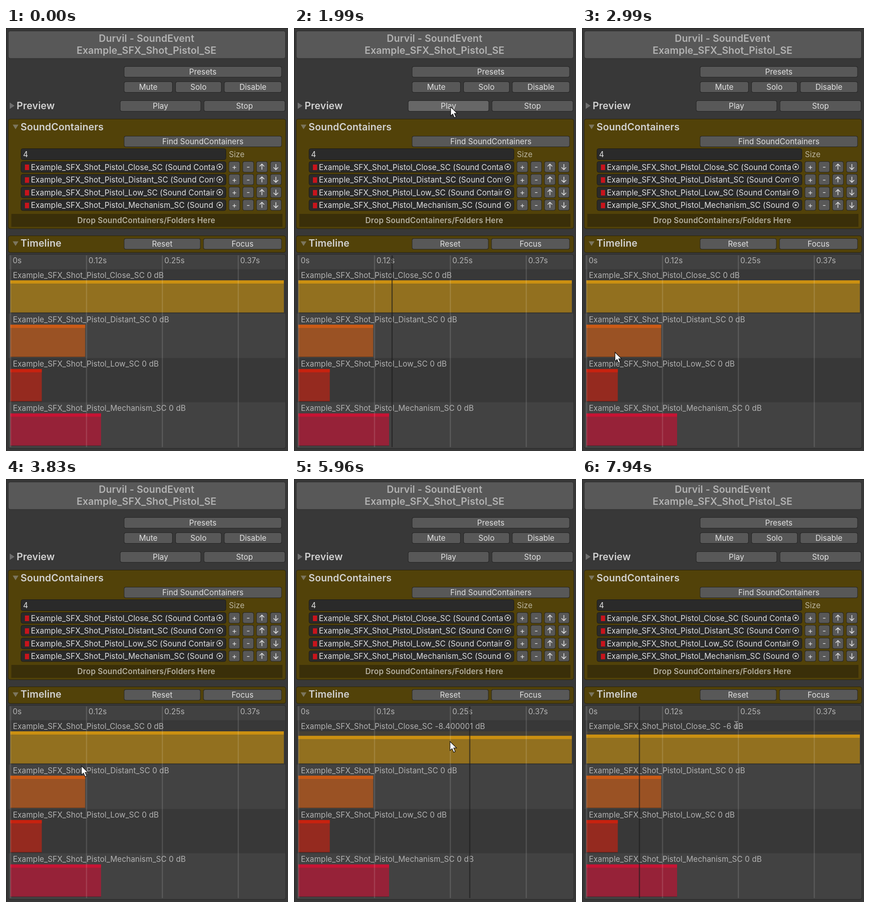
An HTML page that plays this animation: 611 px wide and 917 px high, repeating every 8 s.

```html
<!DOCTYPE html>
<html lang="en">
<head>
<meta charset="utf-8">
<title>Sound event inspector</title>
<style>
  html, body { margin: 0; width: 100%; height: 100%; overflow: hidden; background: #383838; }
  svg { display: block; width: 100%; height: 100%; }
  text { font: 16.7px Inter, sans-serif; font-optical-sizing: none; letter-spacing: .06px; fill: #e0e0e0; white-space: pre; }
  .bold { font-weight: 600; letter-spacing: .2px; }
  .head { font-weight: 600; font-size: 21.2px; letter-spacing: .12px; fill: #d2d2d2; }
  .dim { fill: #b2b2b2; }
  .mid { text-anchor: middle; }
</style>
</head>
<body>
<svg id="stage" viewBox="0 0 611 917" xmlns="http://www.w3.org/2000/svg"></svg>
<script>
const LOOP = 8000;
const ZERO_X = 10, SPEED = 1.315, END_X = 602;

const rect = (x, y, w, h, fill, more = '') =>
  `<rect x="${x}" y="${y}" width="${w}" height="${h}" fill="${fill}" ${more}/>`;
const text = (x, y, str, cls = '', more = '') =>
  `<text x="${x}" y="${y}" class="${cls}" ${more}>${str}</text>`;
const path = (d, fill, more = '') => `<path d="${d}" fill="${fill}" ${more}/>`;
const frame = (x, y, w, h, fill, edge, r = 4) =>
  rect(x + .5, y + .5, w - 1, h - 1, fill, `rx="${r}" stroke="${edge}"`);

function button(x, y, w, label, id = '') {
  return rect(x, y, w, 24, '#262626', 'rx="4"') +
    rect(x + 1, y + 1, w - 2, 22, '#585858', `rx="3.5" ${id && `id="${id}"`}`) +
    text(x + w / 2, y + 18, label, 'mid');
}

function arrowButton(x, y, dir) {
  const cx = x + 12.2, cy = y + 12;
  return button(x, y, 24.5, '') +
    path(`M${cx} ${cy - 6 * dir}V${cy + 6 * dir}M${cx - 5} ${cy + dir}L${cx} ${cy + 6 * dir}L${cx + 5} ${cy + dir}`,
      'none', 'stroke="#e0e0e0" stroke-width="1.6"');
}

const sounds = [
  { name: 'Close', end: 602, top: '#cb9011', body: '#92701f' },
  { name: 'Distant', end: 171.5, top: '#cb5a15', body: '#9a5224' },
  { name: 'Low', end: 77.5, top: '#c8220f', body: '#952a1f' },
  { name: 'Mechanism', end: 206, top: '#c81334', body: '#962238' }
];
const asset = s => `Example_SFX_Shot_Pistol_${s.name}_SC`;

function objectRow(s, i) {
  const y = 289 + i * 27.6;
  return frame(32, y, 445, 24.5, '#2a2a2a', '#1e1c14') +
    rect(41, y + 7, 9, 12, '#c8141c') +
    text(54, y + 18.5, asset(s) + ' (Sound Container)', '', 'clip-path="url(#field)"') +
    `<circle cx="463" cy="${y + 12}" r="6.3" fill="none" stroke="#c4c4c4" stroke-width="1.5"/>` +
    `<circle cx="463" cy="${y + 12}" r="2.4" fill="#c4c4c4"/>` +
    button(482.5, y, 24.5, '+') + button(512.5, y, 24.5, '-') +
    arrowButton(542.3, y, -1) + arrowButton(572.5, y, 1);
}

function track(s, i) {
  const y = 547 + i * 96.2, w = s.end - 9.5;
  const first = i === 0;
  return rect(9.5, y, w, 70, s.top, 'opacity=".09"') +
    rect(9.5, y, w, 70, s.body, first ? 'id="body"' : '') +
    rect(9.5, y, w, 7, s.top, first ? 'id="strip"' : '') +
    rect(9.5, y + 69, w, 1.5, '#000', 'opacity=".2"');
}

const trackLabel = (s, i) =>
  text(15, 541.7 + i * 96.2, asset(s) + ' 0 dB', 'dim', i ? '' : 'id="label"');

const gridLine = i => rect(8.8 + i * 164.4, 493, 2.5, 415.5, '#fff', 'opacity=".13"');

const tip = ['Previews the SoundEvent.', '', 'Does not work if Nolvy cannot build the project, or',
  'if the game is paused.', '', "Preview doesn't play more than one level of",
  'TriggerOnPlay/Stop/Tail at the moment (there is', 'full functionality ingame).', '',
  'The default shortcut is Ctrl+Q.'];

const olive = '#524209', oliveEdge = '#2c2408';
const stage = document.getElementById('stage');
stage.innerHTML = [
  '<clipPath id="field"><rect x="54" y="280" width="398" height="130"/></clipPath>',
  rect(0, 0, 611, 917, '#383838'),
  rect(0, 0, 1.5, 917, '#2a2a2a'), rect(0, 0, 611, 1.5, '#2a2a2a'),

  frame(4.5, 6, 601.5, 60.5, '#585858', '#2c2c2c'),
  text(304.5, 30.3, 'Durvil - SoundEvent', 'head mid', 'style="fill:#b2b2b2"'),
  text(304.5, 56.3, 'Example_SFX_Shot_Pistol_SE', 'head mid', 'style="fill:#b2b2b2"'),

  button(255.5, 83, 342, 'Presets'),
  button(255.5, 116, 105.5, 'Mute'), button(367, 116, 100, 'Solo'), button(472.5, 116, 125, 'Disable'),
  path('M8 161.5L18.5 168.5L8 175.5Z', '#6e6e6e'),
  text(23, 175.8, 'Preview', 'head'),
  button(247, 157, 175.5, 'Play', 'play'), button(428.5, 157, 176.5, 'Stop'),

  frame(4.5, 197, 602, 238.5, olive, oliveEdge),
  path('M14.5 209.5H27L20.7 219.5Z', '#7c765f'),
  text(31.5, 221.5, 'SoundContainers', 'head'),
  button(255.5, 234, 342, 'Find SoundContainers'),
  frame(32, 261, 445, 25, '#2a2a2a', '#1e1c14'),
  text(37, 279.5, '4'), text(483, 279.5, 'Size', '', 'style="fill:#bbb5a0"'),
  ...sounds.map(objectRow),
  rect(11.5, 403, 587.5, 28, '#3a2f09'),
  text(304, 422.5, 'Drop SoundContainers/Folders Here', 'bold mid', 'style="fill:#b3ae9e"'),

  frame(4.5, 450, 602, 37, olive, oliveEdge),
  path('M14.5 462.5H27L20.7 472.5Z', '#7c765f'),
  text(31.5, 474.3, 'Timeline', 'head'),
  button(255.5, 456, 166, 'Reset'), button(427.5, 456, 170, 'Focus'),

  frame(4.5, 490, 602, 422, '#414141', '#262626'),
  ...sounds.map((s, i) => rect(5.5, 523 + i * 96.2, 600, 96.2, i % 2 ? '#424242' : '#383838')),
  ...sounds.map(track),
  ...[0, 1, 2, 3].map(gridLine),
  ...['0s', '0.12s', '0.25s', '0.37s'].map((s, i) => text(14.5 + i * 164.3, 509.5, s, 'dim')),
  rect(304, 527, 87, 22, '#3a72b0', 'id="selection"'),
  ...sounds.map(trackLabel),
  rect(322, 527, 1.3, 20, '#d0d0d0', 'id="caret"'),
  rect(-1.3, 493, 2.6, 415.5, '#1c1c1c', 'id="playhead" opacity=".62"'),

  '<g id="tooltip">' + rect(134, 185, 410.5, 212.5, '#393939', 'stroke="#1b1b1b" stroke-width="1.6"') +
    tip.map((s, i) => text(139, 207 + i * 20.2, s, '', 'style="fill:#cfcfcf"')).join('') + '</g>',

  '<g id="pointer">',
  path('M0 0V19.5L4.5 15.4L8 23.4L11.4 22L8 14.2H14.2Z', '#fff',
    'class="arrow" stroke="#111" stroke-width="1.2"'),
  path('M0 -10L4.2 -5H1.3V5H4.2L0 10L-4.2 5H-1.3V-5H-4.2Z', '#000',
    'class="resize" stroke="#ddd" stroke-width=".8"'),
  path('M-4 -7.5Q0 -7.5 0 -5.5Q0 -7.5 4 -7.5M0 -5.5V6M-3 7.5Q0 7.5 0 6Q0 7.5 3 7.5', 'none',
    'class="beam" stroke="#a8a8a8" stroke-width="1.3"'),
  '</g>'
].join('');

const $ = id => document.getElementById(id);
const show = (el, on) => { el.style.display = on ? '' : 'none'; };

// Pointer stops: time, x, y
const route = [
  [720, 1, 590], [900, 130, 470], [1080, 400, 300], [1200, 516, 200], [1320, 410, 145], [1440, 339.5, 171],
  [2450, 339.5, 171], [2510, 329, 258], [2570, 305, 350], [2690, 190, 520], [2810, 60, 640],
  [2930, 33, 690], [3050, 110, 716], [3260, 200, 715], [3410, 270, 735], [3530, 288, 710],
  [3650, 240, 668], [3830, 163.5, 622], [3950, 146, 575], [4100, 138, 540], [4369, 138, 540],
  [4430, 145, 555], [4650, 145, 540], [4770, 145, 523], [4830, 145, 548], [4890, 145, 578],
  [4950, 145, 597], [5070, 145, 601], [5310, 145, 603], [5480, 145, 603], [5600, 175, 604],
  [5720, 250, 598], [5840, 315, 585], [5960, 338, 569], [6080, 337, 545], [6260, 334, 533]
];
const holds = [[1440, 2510], [4430, 4650]];
const plays = [1836, 5678, 7853];

const ticks = [0, 1870, 2510, 4370, 4650, 5480, 6590, 7880];
function snap(t) {
  const base = ticks.filter(b => b <= t).pop();
  return base + Math.floor((t - base) / 60) * 60;
}

function pointerAt(t) {
  const hold = holds.find(([from, to]) => t >= from && t < to);
  if (hold) t = hold[0];
  const i = route.findIndex(p => p[0] > t);
  if (i < 0) return route[route.length - 1].slice(1);
  if (i === 0) return route[0].slice(1);
  const [a, ax, ay] = route[i - 1], [b, bx, by] = route[i];
  const k = (t - a) / (b - a);
  return [ax + (bx - ax) * k, ay + (by - ay) * k];
}

function volumeAt(t, tick) {
  if (t < 4680) return [0, '0'];
  if (t < 5310) {
    const db = Math.round(Math.max(0, pointerAt(tick)[1] - 540) / .75) / 10;
    return [db, db ? '-' + db : '0'];
  }
  if (t < 7050) return [8.4, '-8.400001'];
  return t < 7300 ? [0, '-'] : [6, '-6'];
}

function draw(t) {
  const tick = snap(t);
  const [x, y] = pointerAt(tick);
  const kind = t >= 6260 ? 'beam' : t >= 4430 && t < 5480 ? 'resize' : 'arrow';
  const pointer = $('pointer');
  show(pointer, t >= 720);
  pointer.setAttribute('transform', `translate(${x} ${y})`);
  for (const el of pointer.children) show(el, el.classList.contains(kind));

  $('play').setAttribute('fill', tick >= 1440 && t < 2320 ? '#676767' : '#585858');
  show($('tooltip'), t >= 2320 && t < 2570);

  const [db, shown] = volumeAt(t, tick);
  const top = 547 + db * 70 / 60;
  $('strip').setAttribute('y', top);
  $('body').setAttribute('y', top);
  $('body').setAttribute('height', 617 - top);
  $('label').textContent = `${asset(sounds[0])} ${shown} dB`;

  show($('selection'), t >= 6500 && t < 7050);
  show($('caret'), t >= 7050 && t < 7510);
  $('caret').setAttribute('x', t < 7300 ? 311 : 322);

  const start = plays.filter(p => p <= tick).pop();
  const headX = ZERO_X + (tick - start) * SPEED;
  show($('playhead'), headX < END_X);
  $('playhead').setAttribute('transform', `translate(${headX || 0} 0)`);
}

function loop() {
  draw(performance.now() % LOOP);
  requestAnimationFrame(loop);
}
loop();
</script>
</body>
</html>
```
